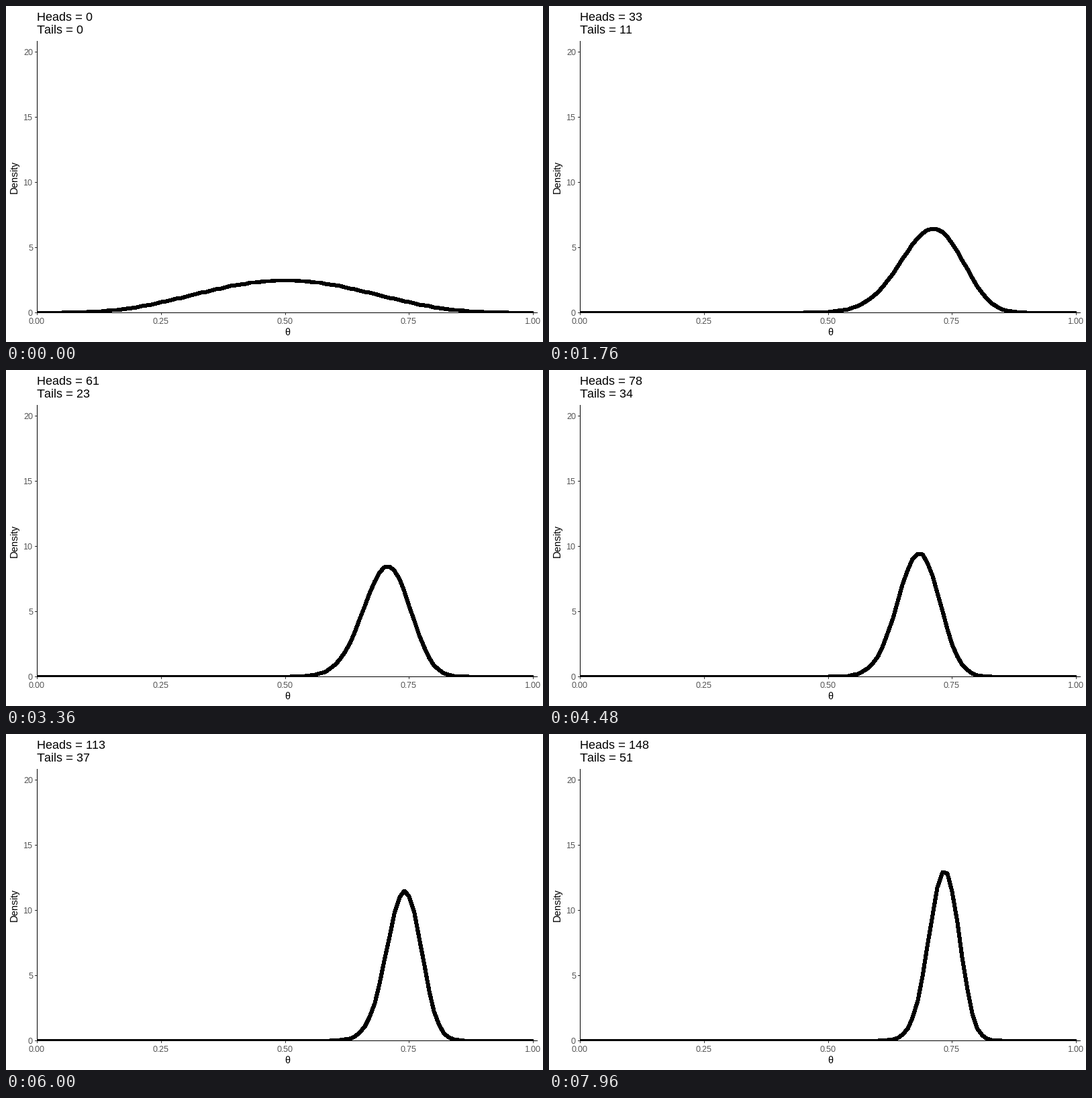
A matplotlib script that plays this animation: 800x500 px, repeating every 8 s.

```python
import math

import numpy as np
import matplotlib.pyplot as plt
from matplotlib.animation import FuncAnimation
from matplotlib.patches import Rectangle

plt.rcParams["font.family"] = "Liberation Sans"
plt.rcParams["text.hinting"] = "native"
plt.rcParams["text.hinting_factor"] = 1

W, H, DPI = 800, 500, 100
PX = 72 / DPI                      # points per pixel
LEFT, RIGHT, TOP, BASE = 46, 792, 52, 456
PRIOR = 5                          # Beta(5, 5)
TOSSES = 200

# Tosses that came up tails; all others are heads
TAILS = [3, 5, 8, 11, 14, 17, 19, 23, 31, 41, 44, 48, 51, 55, 58, 62,
         66, 69, 71, 74, 77, 80, 82, 85, 87, 90, 93, 96, 98, 101, 104,
         107, 109, 111, 118, 134, 145, 152, 156, 161, 166, 170, 172,
         176, 179, 181, 184, 186, 188, 191, 196]

fig = plt.figure(figsize=(W / DPI, H / DPI), dpi=DPI, facecolor="white")
ax = fig.add_axes([0, 0, 1, 1])
ax.set_xlim(0, W)
ax.set_ylim(H, 0)
ax.axis("off")


def bar(x, y, w, h, color):
    ax.add_patch(Rectangle((x, y), w, h, fc=color, lw=0, antialiased=False, zorder=3))


def label(x, y, text, size, color="black", **kw):
    kw.setdefault("va", "baseline")
    return ax.text(x, y, text, fontsize=size * PX, color=color, **kw)


def to_x(theta):
    return 46.4 + 738.6 * theta


def beta_density(theta, a, b):
    norm = math.lgamma(a + b) - math.lgamma(a) - math.lgamma(b)
    out = np.zeros_like(theta)
    t = theta[1:-1]
    out[1:-1] = np.exp(norm + (a - 1) * np.log(t) + (b - 1) * np.log(1 - t))
    return out


# Axes, ticks and labels
bar(LEFT, TOP, 1, BASE + 1 - TOP, "black")
bar(LEFT, BASE, RIGHT - LEFT, 1, "black")
for k in range(5):
    y = BASE - 97 * k
    bar(LEFT - 3, y, 3, 1, "#333333")
    label(40, y + 5, str(5 * k), 12, "#4d4d4d", ha="right")
    x = int(round(to_x(k / 4)))
    bar(x, BASE + 1, 1, 3, "#333333")
    label(x, 473, f"{k / 4:.2f}", 12, "#4d4d4d", ha="center")
label(419, 490, "θ", 15, ha="center")
label(20, 254.5, "Density", 15, rotation=90, ha="right", va="center")

heads_text = label(46, 22, "", 18)
tails_text = label(46, 41, "", 18)

theta = np.linspace(0, 1, 101)
curve_x = np.round(to_x(theta)) + 0.5
curve, = ax.plot([], [], color="black", lw=5 * PX, antialiased=False,
                 solid_capstyle="butt", solid_joinstyle="round", snap=False)
curve.set_clip_path(Rectangle((LEFT, TOP), RIGHT - LEFT, BASE + 1 - TOP,
                              transform=ax.transData))


def draw(n):
    tails = sum(t <= n for t in TAILS)
    heads = n - tails
    density = beta_density(theta, PRIOR + heads, PRIOR + tails)
    curve.set_data(curve_x, np.round(455.61 - 19.41 * density) + 0.5)
    heads_text.set_text(f"Heads = {heads}")
    tails_text.set_text(f"Tails = {tails}")
    return curve, heads_text, tails_text


anim = FuncAnimation(fig, draw, frames=TOSSES, interval=40, repeat=True,
                     repeat_delay=0, blit=False)
plt.show()
```
